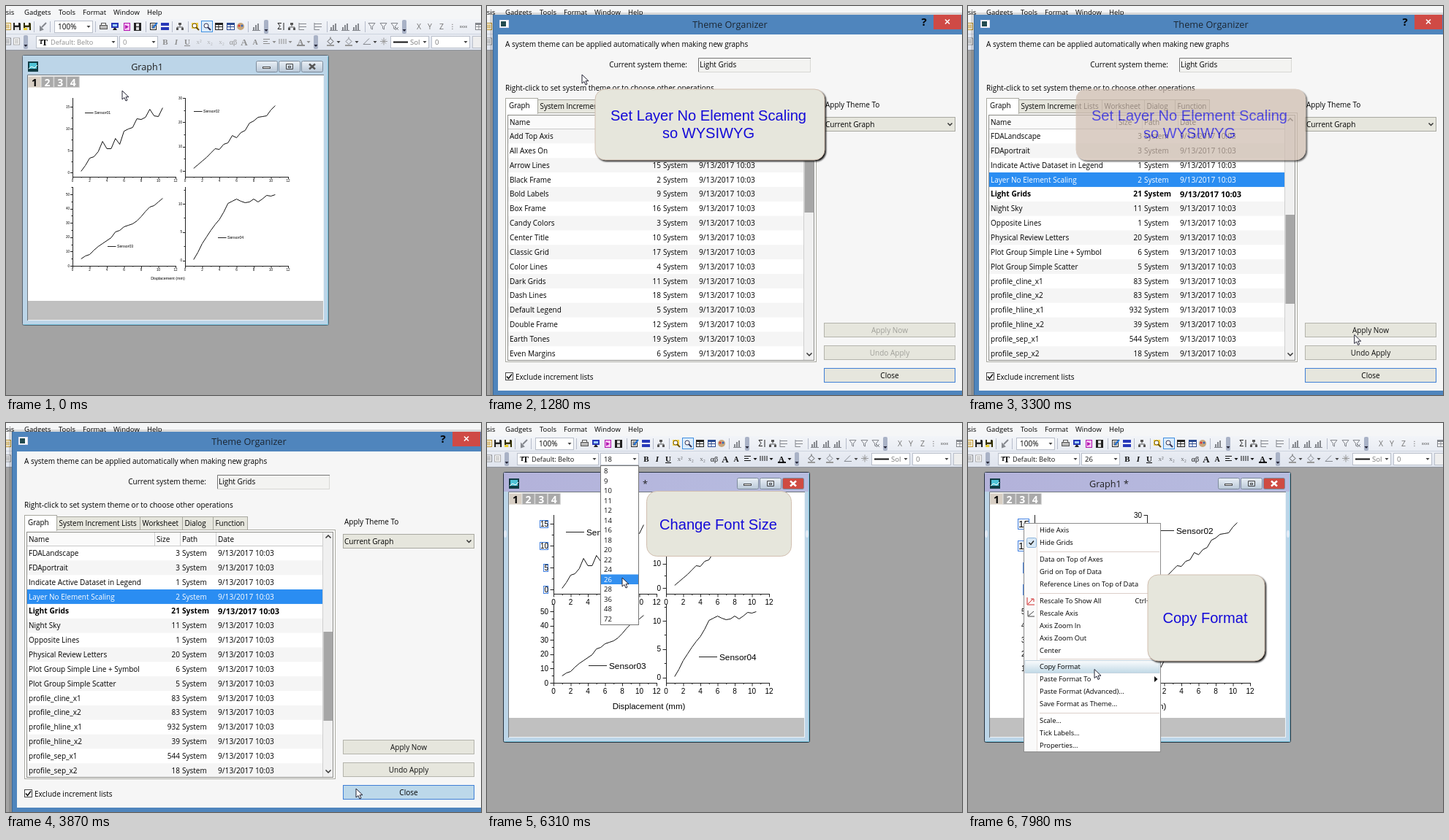
Recreate the animation shown at these times as an HTML page. Size 650x533 px, loop 8000 ms.

```html
<!DOCTYPE html>
<html lang="en">
<head>
<meta charset="utf-8">
<title>Graph formatting demo</title>
<style>
html, body { margin: 0; width: 100%; height: 100%; overflow: hidden; background: #a3a3a3; }
svg { display: block; width: 650px; height: 533px; font-family: "Open Sans", sans-serif; }
text { white-space: pre; }
.plot { font-family: "Liberation Sans", sans-serif; font-kerning: none; }
</style>
</head>
<body>
<svg id="stage" viewBox="0 0 650 533"></svg>
<script>
const LOOP = 8000;

// ---------- markup helpers ----------
const rect = (x, y, w, h, fill, more = '') =>
  `<rect x="${x}" y="${y}" width="${w}" height="${h}" fill="${fill}" ${more}/>`;
const box = (x, y, w, h, fill, stroke, more = '') =>
  rect(x + .5, y + .5, w - 1, h - 1, fill, `stroke="${stroke}" ${more}`);
const path = (d, stroke, more = '') => `<path d="${d}" fill="none" stroke="${stroke}" ${more}/>`;
const shape = (d, fill, more = '') => `<path d="${d}" fill="${fill}" ${more}/>`;
// y is the middle of the line of text
const text = (x, y, s, size, more = '') =>
  `<text x="${x}" y="${y + size * .36}" font-size="${size}" ${more}>${s}</text>`;
const group = (id, body, more = '') => `<g id="${id}" ${more}>${body}</g>`;
const at = (x, y, body) => `<g transform="translate(${x} ${y})">${body}</g>`;
const END = 'text-anchor="end"', MID = 'text-anchor="middle"', BOLD = 'font-weight="700"';
const arrow = (x, y, c = '#444') => shape(`M${x - 2.5} ${y - 1}h5l-2.5 3z`, c);

// ---------- menu bar and toolbars ----------
function combo(x, w, y, label, size) {
  return box(x, y, w, 17, '#fff', '#b9bfca') + arrow(x + w - 6, y + 8) +
    (label ? text(x + 5, y + 8.5, label, size) : '');
}

function icons() {
  const G = '#85888e', K = '#222', B = '#2738b8';
  const disk = c => shape('M-5-5h9l1 1v9h-10z', c) + rect(-3, -5, 5, 3.5, '#fff') + rect(-3, 1, 6, 4, '#ddd');
  const page = c => box(-4, -5, 9, 10, '#fff', c) + path('M-2-2h5M-2 0h5M-2 2h5', c);
  const grid = c => box(-5, -5, 11, 10, '#fff', c) + rect(-5, -5, 11, 3, c) + path('M-5 .5h10M0-4v8', c);
  const lens = c => `<circle r="3" fill="#fff" stroke="${c}" cx="-1" cy="-1"/>` + path('M1 1l4 4', c, 'stroke-width="2"');
  const bars = c => shape('M-5 5v-4h2v4zM-2 5v-7h2v7zM1 5v-9h2v9z', c) + path('M-6 5.5h11', c);
  const rows = c => path('M-5-3.5h10M-5 .5h10M-5 4.5h7', c) + path('M-5-5v10', c);
  const tree = c => path('M0-3v3M-4 4v-3h8v3', c) + rect(-2, -5, 4, 3, c) + rect(-5, 2, 3, 3, c) + rect(2, 2, 3, 3, c);
  const funnel = c => path('M-5-4.5h9l-3.5 4.5v4l-2-1v-3z', c);
  const monitor = rect(-5, -5, 10, 7, B) + rect(-3, -3, 6, 3, '#9fd0f5') + shape('M-3 5h6l-2-3h-2z', K);
  const film = rect(-5, -5, 10, 11, K) + rect(-2, -4, 4, 4, '#ddd') + rect(-2, 1, 4, 4, '#ddd');
  const bucket = c => path('M-4 0l4-4 4 4-4 4zM0-4v-2', c) + rect(-5, 4.5, 10, 2, '#999');
  const list = [
    [2, page('#b98d1c')], [15, disk(K)], [29, disk('#343000') + rect(-5, 2, 5, 3, '#e8cf2d')],
    [51, path('M4-5l-6 6M-4 1l3 3-3 1z', G, 'stroke-width="2"')],
    [133, box(-5, -2, 11, 6, '#bbb', '#555') + box(-3, -5, 7, 4, '#fff', '#555')], [149, monitor],
    [165, box(-4, -5, 9, 11, '#f6c4f3', '#b315b0') + shape('M-2-2l5 2.5-5 3z', '#b315b0')], [180, film],
    [201, page(K) + path('M6-5l-6 7', '#1f72d8', 'stroke-width="2"')],
    [217, rect(-5, -5, 11, 4, B) + rect(-5, 1, 11, 4, B)], [238, tree('#555')],
    [259, rect(-5, -5, 9, 8, '#f1ce42') + lens('#6b5310')],
    [275, box(-8, -8, 16, 16, '#dcecfb', '#3f8fe0') + lens('#335')],
    [291, grid(K)], [307, grid('#2b4a91')],
    [321, `<circle r="5" fill="#c7a67b"/><circle r="1.5" cx="-2" cy="-1" fill="#d33"/><circle r="1.5" cx="2" cy="-1" fill="#36b"/>`],
    [343, bars(G)], [376, path('M1-4.5h-5l3 4-3 4h5', K) + path('M4-5v10', K)], [391, tree('#555')],
    [406, rows(G)], [427, rows(G)], [449, bars(G)], [465, bars(G)], [480, bars(G)],
    [501, funnel(G)], [517, funnel(G)], [532, funnel(G) + path('M1 1l4 4M5 1l-4 4', G)], [647, grid(G)]
  ];
  const low = [
    [2, page(G)], [14, page('#aaa')], [444, bucket('#555')], [469, bucket(G)],
    [494, path('M-5 4l8-8M-5 4h10', G)], [517, path('M-5 0h10M0-5v10M-3-3l6 6M3-3l-6 6', '#999')]
  ];
  return list.map(([x, s]) => at(x, 28, s)).join('') + low.map(([x, s]) => at(x, 48.5, s)).join('');
}

function toolbar() {
  const cap = (x, y) => rect(x - 3, y, 6, 19, '#a9b2c6', 'rx="2"') + arrow(x, y + 14, '#223');
  const bar = [[-5, 'ysis'], [25, 'Gadgets'], [72, 'Tools'], [105, 'Format'], [147, 'Window'], [193, 'Help']];
  const seps = [38, 60, 122, 191, 227, 249, 331, 439, 491];
  const letters = [[565, 'X'], [580, 'Y'], [596, 'Z'], [611, '⁝']];
  const format = [
    [218, 'B', 11, BOLD], [233, 'I', 11, BOLD + ' font-style="italic"'],
    [248, 'U', 11, BOLD + ' text-decoration="underline"'],
    [264, 'x²', 9, 'opacity=".6"'], [279, 'x₂', 9, 'opacity=".6"'], [295, 'x₂', 9, 'opacity=".6"'],
    [311, 'αβ', 10, ''], [326, 'A', 13, BOLD], [341, 'A', 10, BOLD], [403, 'A', 11, BOLD]
  ];
  const serif = 'font-family="Liberation Serif, serif"';
  return rect(0, 0, 650, 18, '#f5f6f7') + rect(0, 18, 650, 43, 'url(#strip)') +
    path('M0 38.5H650', '#cdd3df') + path('M0 60.5H650', '#8f949d') +
    bar.map(([x, s]) => text(x, 9, s, 9.5)).join('') +
    seps.map(x => path(`M${x + .5} 21v15`, '#b6bccb')).join('') +
    combo(66, 53, 20, '100%', 10) + icons() +
    letters.map(([x, s]) => text(x, 28.5, s, 10.5, `${MID} fill="#777"`)).join('') +
    text(626, 28, 'xxxx', 5, `${MID} fill="#444"`) +
    cap(356, 19) + cap(545, 19) + cap(27, 40) + cap(424, 40) +
    combo(41, 112, 41, '') + combo(155, 53, 41, '') + combo(526, 53, 41, '') + combo(582, 53, 41, '') +
    path('M530 49.5h20', '#111', 'stroke-width="2"') +
    text(553, 49.5, 'Sol', 9.5, 'fill="#777"') + text(587, 49.5, '0', 9.5, 'fill="#777"') +
    box(638, 41, 14, 17, '#eee', '#b9bfca') +
    text(45, 49, 'T', 9, `${BOLD} ${serif}`) + text(49, 50, 'T', 12, `${BOLD} ${serif}`) +
    group('format',
      text(61, 49.5, 'Default: Belto', 9.2) +
      format.map(([x, s, z, m]) => text(x, 49, s, z, `${MID} ${serif} ${m}`)).join('') +
      path('M352 45.5h9M352 48.5h6M352 51.5h9M374 45v7M377 45v7M380 45v7M383 45v7', 'currentColor') +
      rect(398, 53, 11, 2, 'currentColor') + [367, 389, 414].map(x => arrow(x, 49, 'currentColor')).join(''),
      'fill="currentColor"') +
    text(160, 49.5, '', 9.5, 'id="size"') + [455, 480, 505].map(x => arrow(x, 49)).join('');
}

// ---------- graph window ----------
const panels = [
  { x: 91, top: 126, zero: 228, step: 30, inc: 5, n: 3, lx: 108, ly: 146,
    ys: [226, 218, 208, 206, 199, 185, 195, 195, 181, 189, 171, 168, 166, 154, 155, 152, 141, 150, 151, 139] },
  { x: 245, top: 126, zero: 226, step: 33.3, inc: 10, n: 3, lx: 257, ly: 143.5,
    ys: [222, 217, 212, 207, 201, 195, 196, 189, 187, 177, 180, 173, 170, 160, 157, 152, 151, 150, 142, 136] },
  { x: 91, top: 248, zero: 356, step: 19.6, inc: 10, n: 5, lx: 139, ly: 328.5,
    ys: [346, 342, 340, 334, 329, 325, 321, 317, 309, 307, 302, 300, 298, 294, 288, 281, 275, 273, 268, 263] },
  { x: 245, top: 248, zero: 348.5, step: 38.7, inc: 5, n: 2, lx: 290, ly: 316.5,
    ys: [347, 337, 325, 316, 307, 299, 292, 282, 270, 267, 264, 267, 269, 268, 264, 268, 264, 259, 260, 258] }
];
const tickY = (p, k) => p.zero - k * p.step;

function panel(p, i, big) {
  const base = p.top + 108, unit = 11.75, len = big ? 4.5 : 3, size = big ? 10 : 4.6;
  let ticks = '', labels = '';
  for (let k = 0; k <= 12; k++) {
    ticks += `M${p.x + .5 + k * unit} ${base}v${k % 2 ? len / 2 : len}`;
    if (k % 2 === 0) labels += text(p.x + k * unit, base + (big ? 11 : 5.5), k, size, MID);
  }
  for (let k = 0; k <= 2 * p.n + 1; k++) {
    const y = tickY(p, k / 2);
    if (y < p.top - 1) break;
    ticks += `M${p.x} ${Math.round(y) + .5}h${k % 2 ? -len / 2 : -len}`;
    if (k % 2 === 0 && !(big && i === 0))
      labels += text(p.x - (big ? 7 : 4), y, k / 2 * p.inc, size, END);
  }
  const line = p.ys.map((y, k) => `${p.x + unit * (1 + k / 2)} ${y + .5}`).join('L');
  const ly = Math.round(p.ly + (big ? 3 : 0)) + .5;
  return path(`M${p.x + .5} ${p.top}V${base + .5}H${p.x + 142}` + ticks, '#222') +
    path('M' + line, '#111', 'stroke-linejoin="round"') + labels +
    path(`M${p.lx} ${ly}h${big ? 25 : 11.5}`, '#222') +
    text(p.lx + (big ? 28 : 13), ly, 'Sensor0' + (i + 1), big ? 11.8 : 5.2);
}

function axisLabels(size, boxed) {
  const p = panels[0];
  return [0, 1, 2, 3].map(k => {
    const s = String(k * p.inc), w = s.length * size * .556 + 1, y = tickY(p, k);
    const frame = boxed ? box(Math.round(84 - w), Math.round(y - size / 2), Math.round(w), Math.round(size + 1), '#fff', '#3f7ee0') : '';
    return frame + text(84, y, s, size, END);
  }).join('');
}

function graphWindow() {
  const frame = (id, edge, fill, close, mark) => group(id,
    box(22, 67, 420, 371, '#bcd5e8', edge, 'rx="2"') + rect(23, 68, 418, 26, fill) +
    path('M24 436.5H440.5V69', '#79c3da') +
    [342, 373, 404].map((x, i) => box(x, 75, 30, 16, i < 2 ? 'url(#button)' : close, '#7d8b9b', 'rx="2"')).join('') +
    path('M351 84.5h11', '#444', 'stroke-width="3"') + path('M352 84.5h9', '#fff') +
    path('M383.5 79.5h9v7h-9zM386.5 82.5h3v2h-3z', '#444') +
    path('M415 79.5l8 7M423 79.5l-8 7', mark, 'stroke-width="2.5"'));
  const tabs = [1, 2, 3, 4].map(n => {
    const x = 30 + (n - 1) * 17.6;
    return box(x, 96, 18, 16, n > 1 ? '#a9a9a9' : '#d8cfc4', n > 1 ? '#d6d6d6' : '#e8e4de') +
      text(x + 9, 104.5, n, 14, `${MID} ${BOLD} fill="${n > 1 ? '#fff' : '#000'}"`);
  }).join('');
  const plots = big => panels.map((p, i) => panel(p, i, big)).join('') +
    text(221.5, big ? 387.5 : 373, 'Displacement (mm)', big ? 11.5 : 5.4, MID);
  return frame('idle', '#59646f', '#bcd5e8', 'url(#button)', '#555') +
    frame('active', '#27323e', 'url(#title)', '#cf4b42', '#fff') +
    group('handles', '<ellipse cx="25" cy="152" rx="2" ry="5" fill="#e3eaf4"/><ellipse cx="438" cy="152" rx="2" ry="5" fill="#e3eaf4"/>') +
    rect(30, 76, 14, 14, '#123c44') + rect(32, 78, 10, 8, '#4fc3d6') + path('M31 86l4-3 4 2 4-4', '#fff') +
    text(193, 83.5, '', 12.6, `${MID} id="caption" fill="#222"`) +
    rect(29, 94, 406, 337, '#eef3f7') + path('M29.5 431V94.5H435', '#70777e') +
    rect(30, 95, 404, 309, '#fff') + rect(30, 404, 404, 26, '#c0c0c0') + tabs +
    group('small', plots(false), 'class="plot"') +
    group('big', plots(true) + group('plain', axisLabels(10, false)) +
      group('picked', axisLabels(10, true)) + group('grown', axisLabels(13.6, true)), 'class="plot"');
}

// ---------- menus ----------
const toolItems = [
  [26.5, 'Options...', 'Ctrl+U'], [43.5, 'System Variables...'], [55],
  [66.5, 'Fitting Function Builder...', 'F8'], [83.5, 'Fitting Function Organizer...', 'F9'],
  [100.5, 'Theme Organizer...', 'F7'], [117.5, 'Virtual Matrix Manager...'], [128.5],
  [140, 'Transfer User Files...'], [151], [162.5, 'Digitizer...'], [179.5, 'Video Builder...'], [191],
  [202, 'MATLAB Console...'], [219, 'R Console...'], [236, 'Rserve Console...'],
  [253, 'Python Console...'], [270, 'Quantovelia Link...']
];
const plotItems = [
  [147, 'Hide Axis'], [164, 'Hide Grids'], [175.5], [187, 'Data on Top of Axes'], [204, 'Grid on Top of Data'],
  [221, 'Reference Lines on Top of Data'], [232.5], [243.5, 'Rescale To Show All', 'Ctrl+R'],
  [260.5, 'Rescale Axis'], [277.5, 'Axis Zoom In'], [294.5, 'Axis Zoom Out'], [311.5, 'Center'], [322.5],
  [334, 'Copy Format'], [351, 'Paste Format To'], [368, 'Paste Format (Advanced)...'],
  [385, 'Save Format as Theme...'], [397], [408, 'Scale...'], [425, 'Tick Labels...'], [442, 'Properties...']
];

function menu(id, x, y, w, h, items, tx, extra) {
  return group(id, box(x, y, w, h, '#fff', '#8d8d8d') +
    rect(x + 1, y + 1, tx - x - 4, h - 2, '#fafafa') + path(`M${tx - 3.5} ${y + 1}v${h - 2}`, '#e6dfdb') +
    rect(x + 2, 0, w - 4, 17, 'url(#hover)', `id="${id}Hover" stroke="#c3d3df"`) +
    items.map(([cy, s, key]) => s
      ? text(tx, cy, s, 9.35) + (key ? text(x + w - 9, cy, key, 9.35, END) : '')
      : path(`M${tx} ${Math.round(cy) + .5}H${x + w - 2}`, '#dccfc9')).join('') + extra);
}

const menus = () =>
  menu('tools', 67, 16, 195, 277, toolItems, 89,
    box(67, 0, 34, 17, '#bfd9f3', '#5a9be0') + text(72, 9, 'Tools', 9.5) +
    '<circle cx="165.5" cy="286" r="5" fill="#ddd"/>' + path('M163 283l2.5 2 2.5-2M163 286.5l2.5 2 2.5-2', '#222')) +
  menu('popup', 76, 137, 188, 314, plotItems, 98,
    box(80, 157, 14, 14, '#d8e8f6', '#8fb6dc', 'rx="2"') + path('M83.5 164l2.5 2.5 4-5', '#222', 'stroke-width="1.5"') +
    path('M81 249v-10M81 249h10M82 248l7-7M86 241h4v4', '#d02a2a') + path('M82 257v8h9M83 264l7-6', '#444') +
    shape('M255 347l4.5 4-4.5 4z', '#111'));

const sizes = [8, 9, 10, 11, 12, 14, 16, 18, 20, 22, 24, 26, 28, 36, 48, 72];
const sizeTop = 59, sizeRow = 13.5;
const sizeList = () => group('sizes', box(155, 58, 53, 219, '#fff', '#777') +
  rect(156, 0, 51, sizeRow, '#3390f0', 'id="sizeHover"') +
  sizes.map((s, i) => text(160, sizeTop + sizeRow * (i + .5), s, 9.5, `id="s${i}"`)).join(''));

// ---------- dialog ----------
const themes = [
  ...['Add Top Axis', 'All Axes On', 'Arrow Lines', 'Black Frame', 'Bold Labels', 'Box Frame', 'Candy Colors',
    'Center Title', 'Classic Grid', 'Color Lines', 'Dark Grids', 'Dash Lines', 'Default Legend', 'Double Frame',
    'Earth Tones', 'Even Margins', 'Fancy Ticks'].map((s, i) => [s, 1 + i * 7 % 20]),
  ['FDALandscape', 3], ['FDAportrait', 3], ['Indicate Active Dataset in Legend', 1], ['Layer No Element Scaling', 2],
  ['Light Grids', 21], ['Night Sky', 11], ['Opposite Lines', 1], ['Physical Review Letters', 20],
  ['Plot Group Simple Line + Symbol', 6], ['Plot Group Simple Scatter', 5], ['profile_cline_x1', 83],
  ['profile_cline_x2', 83], ['profile_hline_x1', 932], ['profile_hline_x2', 39], ['profile_sep_x1', 544], ['profile_sep_x2', 18]
];
const ROW = 19.85, LISTTOP = 168.5, HIDDEN = 17, CHOSEN = 20;

function themeRow([name, size], i) {
  const y = LISTTOP + ROW * (i + .5), bold = name === 'Light Grids';
  const z = bold ? 10.2 : 10, m = bold ? BOLD : '';
  return (i === CHOSEN ? group('chosen', rect(29, y - ROW / 2, 404, ROW, '#2a8df2')) : '') +
    `<g ${i === CHOSEN ? 'id="chosenText"' : ''}>` + text(31, y, name, z, m) + text(238, y, size, z, `${m} ${END}`) +
    text(241, y, 'System', z, m) + text(290, y, '9/13/2017 10:03', bold ? 11 : 10.2, m) + '</g>';
}

function dialog() {
  const button = (y, s, id, border = '#b4b4ac') =>
    box(461, y, 180, 20, '#e6e6dd', border, `id="${id}Box"`) + text(551, y + 10, s, 10, `${MID} id="${id}"`);
  const tabs = [[69, 114, 'System Increment Lists'], [183, 58, 'Worksheet'], [241, 42, 'Dialog'], [283, 47, 'Function']];
  const stripes = themes.map((_, i) => i % 2 ? '' : rect(29, LISTTOP + ROW * i, 404, ROW, '#f5f5f5'));
  return group('dialog',
    rect(4, 9, 660, 540, '#000', 'opacity=".12"') + rect(8, 12, 650, 530, '#4f85bd') + rect(15, 39, 640, 488, '#f6f6f6') +
    path('M8.5 12V533', '#3c6a9a') + box(17, 19, 13, 11, '#fff', '#dde') + rect(19, 21, 7, 7, '#234b50') +
    text(332.5, 25.5, 'Theme Organizer', 12.7, `${MID} fill="#1c2733"`) + text(598, 22, '?', 15, `${MID} ${BOLD}`) +
    rect(611, 12, 38, 20, '#cf4a45') + path('M627 18.5l6 6M633 18.5l-6 6', '#fff', 'stroke-width="1.6"') +
    text(25, 52, 'A system theme can be applied automatically when making new graphs', 10) +
    text(274, 80.5, 'Current system theme:', 10, END) + box(289, 71, 154, 20, '#f3f3f1', '#d8d8d4') +
    path('M289.5 90V71.5H443', '#777') + text(291, 80, 'Light Grids', 10) +
    text(25, 112, 'Right-click to set system theme or to choose other operations', 10) +
    box(25, 146, 426, 342, '#fff', '#a8a8a0') +
    tabs.map(([x, w, s]) => box(x, 128, w + 1, 19, '#e6e6dd', '#a8a8a0') + text(x + 3.5, 137.5, s, 9.9)).join('') +
    box(25, 126, 45, 22, '#fff', '#a8a8a0') + rect(26, 145, 43, 3, '#fff') + text(30, 136, 'Graph', 9.9) +
    box(28, 149, 420, 337, '#fff', '#8b8b86') +
    `<g clip-path="url(#list)"><g id="rows">${stripes.join('')}${themes.map(themeRow).join('')}</g></g>` +
    rect(29, 150, 405, 18, '#fafafa') + path('M29 168.5H434', '#c9c9c9') +
    path('M203.5 150v18M238.5 150v18M287.5 150v18M433.5 150v335', '#cfcfcf') +
    [[31, 'Name'], [206, 'Size'], [241, 'Path'], [290, 'Date']].map(([x, s]) => text(x, 159, s, 10)).join('') +
    rect(434, 150, 13, 335, '#f0f0f0') + rect(434.5, 0, 13, 122, '#a6a6a6', 'id="thumb"') +
    path('M437.5 157.5l3.5-3.5 3.5 3.5M437.5 475.5l3.5 3.5 3.5-3.5', '#333', 'stroke-width="1.5"') +
    text(463, 135, 'Apply Theme To', 10) + box(461, 152, 180, 20, '#e6e6dd', '#a8a8a0') + text(463, 162.5, 'Current Graph', 10) +
    path('M630.5 160.5l3 3 3-3', '#333', 'stroke-width="1.5"') +
    button(434, 'Apply Now', 'apply') + button(465, 'Undo Apply', 'undo') + button(496, 'Close', 'close', '#3f7fd6') +
    box(25, 502, 11, 11, '#fff', '#444') + path('M27 507.5l2.5 3 4.5-6', '#111', 'stroke-width="1.6"') +
    text(39, 508, 'Exclude increment lists', 10));
}

// ---------- callouts and pointer ----------
function callout(id, x, y, w, h, lines, shadow) {
  const frame = (dx, fill, more) => rect(x + dx, y + dx, w, h, fill, `rx="14" ${more}`);
  return group(id, (shadow ? frame(2, '#111', 'filter="url(#blur)"') : '') +
    frame(0, '#e6e6dc', `id="${id}Fill" stroke="#d2bfb0"`) +
    lines.map(([cx, ly, s]) => text(cx, ly, s, 20.1, `${MID} fill="#140ad8"`)).join(''), 'class="plot"');
}

const pointer = () => group('pointer',
  shape('M0 0V12l3-2.5 2 4.5 2-1-2-4.3h4z', '#fff', 'stroke="#223" stroke-width="1" stroke-linejoin="round"') +
  group('cross', path('M0-3v9M-5 1.5h10', '#111', 'stroke-width="1.5"') +
    shape('M0-5l2 3h-4zM-7 1.5l3-2v4zM7 1.5l-3-2v4z', '#111')));

const gradient = (id, a, b, dir = 'x2="0" y2="1"') =>
  `<linearGradient id="${id}" ${dir}><stop stop-color="${a}"/><stop offset="1" stop-color="${b}"/></linearGradient>`;

const stage = document.getElementById('stage');
stage.innerHTML = '<defs>' + gradient('strip', '#f2f4f8', '#dfe4ee') + gradient('button', '#eaf0f6', '#b9c8d8') +
  gradient('title', '#b3b2da', '#b7bce0', '') + gradient('hover', '#fbfcfd', '#c1d9e6') +
  '<filter id="blur"><feGaussianBlur stdDeviation="1"/></filter>' +
  '<clipPath id="list"><rect x="29" y="169" width="404" height="316"/></clipPath></defs>' +
  rect(0, 0, 650, 533, '#a3a3a3') + toolbar() + graphWindow() + sizeList() + menus() + dialog() + pointer() +
  callout('scaling', 148, 114, 314, 97, [[303, 150, 'Set Layer No Element Scaling'], [303, 174, 'so WYSIWYG']], true) +
  callout('font', 218.5, 93.5, 198, 89, [[316.5, 139, 'Change Font Size']], false) +
  callout('copy', 246, 208, 160, 118, [[324.5, 267, 'Copy Format']], true);

const $ = {};
stage.querySelectorAll('[id]').forEach(n => $[n.id] = n);

// ---------- motion ----------
const clamp = v => Math.max(0, Math.min(1, v));
const ramp = (t, a, b) => clamp((t - a) / (b - a));
const ease = u => u * u * (3 - 2 * u);
const mix = (a, b, u) => a + (b - a) * u;
const show = (id, on) => $[id].style.display = on ? '' : 'none';

const route = [
  [0, 159, 116], [60, 159, 116], [460, 89, 17], [790, 89, 17], [1200, 130, 94], [1440, 130, 94], [1700, 441, 172],
  [1990, 441, 297], [2050, 441, 297], [2280, 272, 263], [2480, 150, 236], [2600, 150, 236], [3000, 540, 439],
  [3150, 540, 439], [3700, 479, 501], [3930, 479, 501], [4580, 77, 135], [4740, 77, 135], [5260, 195, 57],
  [5510, 195, 57], [6060, 185, 212], [6330, 185, 212], [6980, 76, 133], [7500, 76, 133], [7970, 173, 337.5], [LOOP, 173, 337.5]
];

function pointerAt(t) {
  const i = route.findIndex(k => k[0] > t);
  const [a, b] = [route[i - 1], route[i]], u = ease(ramp(t, a[0], b[0]));
  return [mix(a[1], b[1], u), mix(a[2], b[2], u)];
}

function fade(id, u) {
  show(id, u > 0);
  $[id].setAttribute('opacity', u);
  const warm = clamp(u * 2 - 1);
  const [r, g, b] = [[187, 230], [155, 230], [139, 220]].map(([p, q]) => Math.round(mix(p, q, warm)));
  $[id + 'Fill'].setAttribute('fill', `rgb(${r},${g},${b})`);
}

function hover(id, items, y) {
  const hit = items.find(([cy, s]) => s && Math.abs(cy - y) < 8.5);
  show(id, hit);
  if (hit) $[id].setAttribute('y', hit[0] - 8.5);
}

function render(t) {
  const within = (a, b) => t >= a && t < b;
  const [x, y] = pointerAt(t);
  $.pointer.setAttribute('transform', `translate(${x} ${y})`);
  show('cross', within(6980, 7140));

  const active = t >= 60;
  show('idle', !active);
  show('active', active);
  show('handles', active);
  const applied = t >= 3150, picked = t >= 4600, grown = t >= 6340;
  $.caption.textContent = applied ? 'Graph1 *' : 'Graph1';
  show('small', !applied);
  show('big', applied);
  show('plain', !picked);
  show('picked', picked && !grown);
  show('grown', grown);

  const enabled = t >= 4680;
  $.format.style.color = enabled ? '#111' : '#8d8d8d';
  $.size.setAttribute('fill', enabled ? '#111' : '#8d8d8d');
  $.size.textContent = grown ? '26' : enabled ? '18' : '0';

  show('tools', within(760, 1220));
  hover('toolsHover', toolItems, y);
  show('popup', t >= 7140);
  hover('popupHover', plotItems, y);

  show('sizes', within(5510, 6340));
  const over = Math.floor((y - sizeTop) / sizeRow), row = over < 0 ? 7 : Math.min(over, sizes.length - 1);
  $.sizeHover.setAttribute('y', sizeTop + row * sizeRow);
  sizes.forEach((_, i) => $['s' + i].setAttribute('fill', i === row ? '#fff' : '#111'));

  show('dialog', within(1260, 3930));
  const drag = ease(ramp(t, 1700, 1990));
  $.rows.setAttribute('transform', `translate(0 ${-Math.round(drag * HIDDEN) * ROW})`);
  $.thumb.setAttribute('y', 161 + 125 * drag);
  const chosen = t >= 2540;
  show('chosen', chosen);
  $.chosenText.setAttribute('fill', chosen ? '#fff' : '#000');
  $.apply.setAttribute('fill', chosen ? '#111' : '#a0a09a');
  $.undo.setAttribute('fill', applied ? '#111' : '#a0a09a');
  $.closeBox.setAttribute('fill', y > 495 ? '#bcd8ea' : '#e6e6dd');

  fade('scaling', Math.min(ramp(t, 30, 430), 1 - ramp(t, 3200, 3560)));
  fade('font', Math.min(ramp(t, 4860, 5260), 1 - ramp(t, 6400, 6760)));
  fade('copy', ramp(t, 6940, 7220));
}

function tick() {
  render(performance.now() % LOOP);
  requestAnimationFrame(tick);
}
tick();
</script>
</body>
</html>
```
